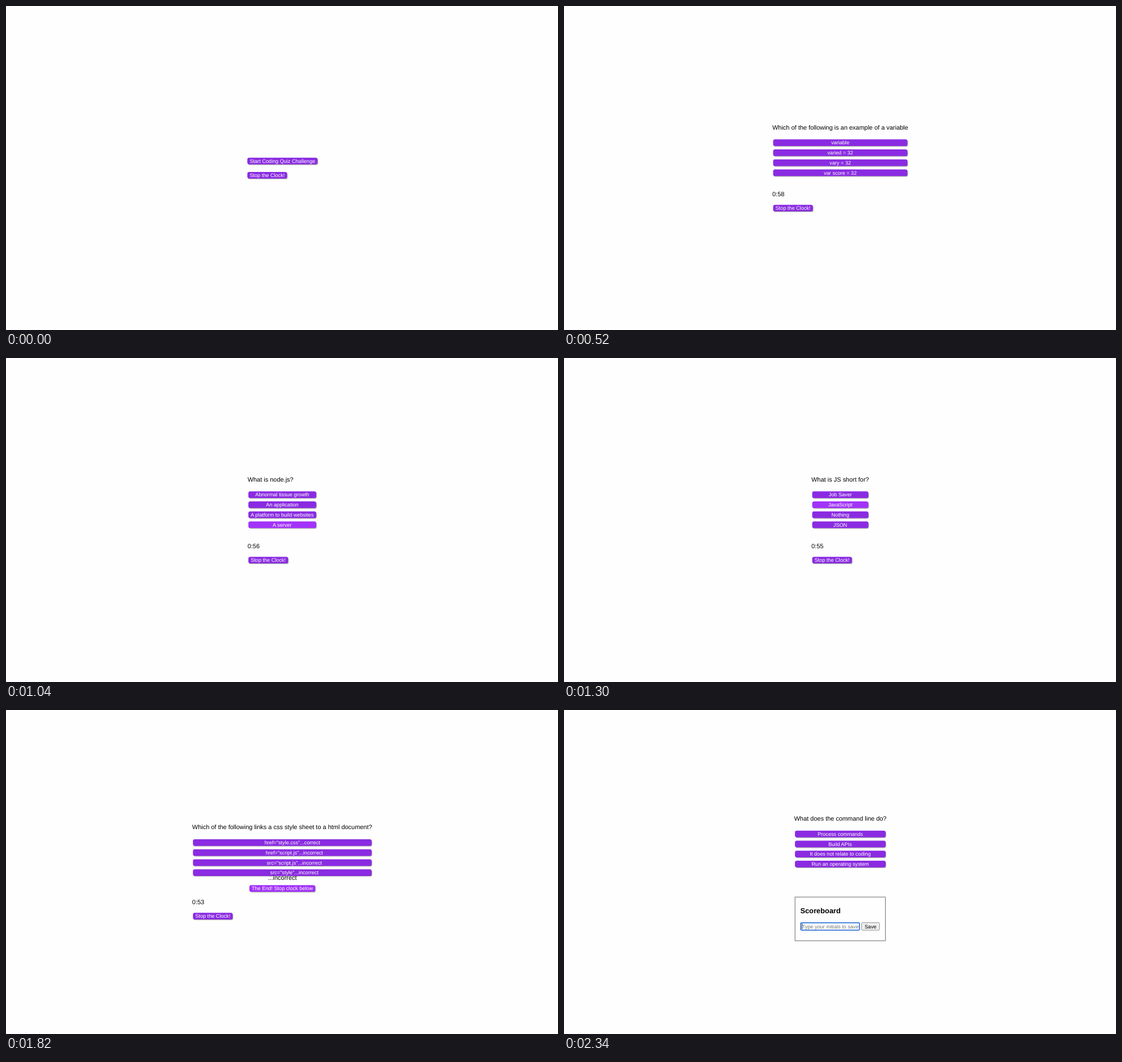
An HTML page that plays this animation: 975 px wide and 574 px high, repeating every 2600 ms.

```html
<!DOCTYPE html>
<html lang="en">
<head>
<meta charset="utf-8">
<title>Coding quiz</title>
<style>
  html, body { margin: 0; width: 100%; height: 100%; overflow: hidden; background: #fefefe; }
  svg { display: block; width: 975px; height: 574px; }
  text { font: 10.96px "Liberation Sans", Arial, Helvetica, sans-serif; text-rendering: geometricPrecision; white-space: pre; }
  .label { font-size: 9.13px; fill: #fff; }
  .button { fill: #8a2be2; }
  .hover { fill: #a233fa; }
  .shadow { fill: #808080; opacity: .65; }
  .heading { font-size: 12.82px; font-weight: bold; }
  .hint { fill: #757575; }
  .dark { fill: #000; }
  .scene { visibility: hidden; animation: short 2600ms step-end infinite; }
  .scene.held { animation-name: long; }
  @keyframes short { 0% { visibility: visible; } 5%, 100% { visibility: hidden; } }
  @keyframes long { 0% { visibility: visible; } 10%, 100% { visibility: hidden; } }
</style>
</head>
<body>
<svg id="stage" viewBox="0 0 975 574"></svg>
<script>
const CENTER = 488, PAD = 4.1, MARGIN = 1.4, HEIGHT = 11.7, ROW = 17.75;
const stage = document.getElementById("stage");
const pen = document.createElement("canvas").getContext("2d");
pen.font = '91.3px "Liberation Sans", Arial, Helvetica, sans-serif';

const quiz = {
  command: { width: 163, ask: "What does the command line do?",
    answers: ["Process commands", "Build APIs", "It does not relate to coding", "Run an operating system"] },
  variable: { width: 240, ask: "Which of the following is an example of a variable", right: 3,
    answers: ["variable", "varied = 32", "vary = 32", "var score = 32"] },
  node: { width: 122.6, ask: "What is node.js?",
    answers: ["Abnormal tissue growth", "An application", "A platform to build websites", "A server"] },
  js: { width: 102, ask: "What is JS short for?", right: 1,
    answers: ["Job Saver", "JavaScript", "Nothing", "JSON"] },
  css: { width: 318.4, ask: "Which of the following links a css style sheet to a html document?", right: 0,
    answers: ['href="style.css"', 'href="script.js"', 'src="script.js"', 'src="style"'] }
};

function add(parent, tag, attrs, content) {
  const node = document.createElementNS("http://www.w3.org/2000/svg", tag);
  for (const key in attrs) node.setAttribute(key, attrs[key]);
  if (content) node.textContent = content;
  return parent.appendChild(node);
}

const labelWidth = words => pen.measureText(words).width / 10;
const write = (g, x, y, words, cls = "") => add(g, "text", { x, y, class: cls }, words);

function button(g, x, mid, width, words, { hover = false, suffix = "", clip = "" } = {}) {
  const box = { width, height: HEIGHT, rx: 3.4 };
  const y = mid - HEIGHT / 2;
  add(g, "rect", { ...box, x: x + 1, y: y + 1.2, class: "shadow" });
  add(g, "rect", { ...box, x, y, class: hover ? "button hover" : "button" });
  const label = write(g, x + (width - labelWidth(words)) / 2, mid + 3.2, words + suffix, "label");
  if (clip) label.setAttribute("clip-path", `url(#${clip})`);
}

function fitButton(g, x, mid, words, hover) {
  button(g, x, mid, labelWidth(words) + 2 * PAD, words, { hover });
}

function middleButton(g, mid, words, hover) {
  fitButton(g, CENTER - labelWidth(words) / 2 - PAD, mid, words, hover);
}

function question(g, name, top, { hover = -1, answered = false } = {}) {
  const { width, ask, answers, right } = quiz[name];
  const left = CENTER - width / 2;
  write(g, left, top, ask);
  const clip = answered ? "edge-" + name : "";
  answers.forEach((answer, i) => button(
    g, left + MARGIN, top + 23.6 + i * ROW, width - 2 * MARGIN, answer,
    { hover: hover === i, suffix: answered ? (i === right ? "...correct" : "...incorrect") : "", clip }
  ));
  return left;
}

const start = () => g => {
  fitButton(g, 426.3, 274.6, "Start Coding Quiz Challenge");
  fitButton(g, 426.3, 299.8, "Stop the Clock!");
};

const open = (name, clock, hover = -1, stop = false) => g => {
  const left = question(g, name, 218.6, { hover });
  write(g, left, 337.2, clock);
  fitButton(g, left + MARGIN, 358, "Stop the Clock!", stop);
};

const checked = (name, clock, verdict, next, hover = -1) => g => {
  const left = question(g, name, 211.2, { hover, answered: true });
  write(g, CENTER, 301.4, verdict).setAttribute("text-anchor", "middle");
  middleButton(g, 316.2, next, hover < 0);
  write(g, left, 344.4, clock);
  fitButton(g, left + MARGIN, 365.2, "Stop the Clock!");
};

const scoreboard = () => g => {
  question(g, "command", 196);
  add(g, "rect", { x: 408.1, y: 331.4, width: 159.6, height: 77.4, fill: "none", stroke: "#929296", "stroke-width": 1.4 });
  write(g, 417.4, 360.3, "Scoreboard", "heading");
  add(g, "rect", { x: 418.1, y: 376.9, width: 103.8, height: 13, rx: 1.4, fill: "#fff", stroke: "#1560d4", "stroke-width": 1.5 });
  write(g, 420.6, 386.6, "Type your initials to save", "label hint");
  add(g, "rect", { x: 420, y: 378.4, width: .9, height: 10, fill: "#000" });
  add(g, "rect", { x: 525.7, y: 376.7, width: 31.6, height: 13.4, rx: 1.8, fill: "#efefef", stroke: "#767676", "stroke-width": .8 });
  write(g, 531, 386.6, "Save", "label dark");
};

// Each entry: start in ms, drawing, and whether it holds for a double beat.
const scenes = [
  [0, start(), true],
  [260, open("command", "0:59"), true],
  [520, open("variable", "0:58")],
  [650, open("variable", "0:58", 1)],
  [780, checked("variable", "0:57", "...incorrect", "Next", 1)],
  [910, checked("variable", "0:57", "...incorrect", "Next")],
  [1040, open("node", "0:56", 3)],
  [1170, open("js", "0:56")],
  [1300, open("js", "0:55", 1), true],
  [1560, checked("js", "0:54", "...correct", "Next")],
  [1690, open("css", "0:54")],
  [1820, checked("css", "0:53", "...incorrect", "The End! Stop clock below"), true],
  [2080, open("command", "0:52")],
  [2210, open("command", "0:52", -1, true)],
  [2340, scoreboard(), true]
];

const defs = add(stage, "defs");
for (const name in quiz) {
  const { width } = quiz[name];
  const edge = add(defs, "clipPath", { id: "edge-" + name });
  add(edge, "rect", { x: CENTER - width / 2, y: 0, width, height: 574 });
}

for (const [begin, draw, held] of scenes) {
  const g = add(stage, "g", { class: held ? "scene held" : "scene", style: `animation-delay:${begin}ms` });
  draw(g);
}
</script>
</body>
</html>
```
